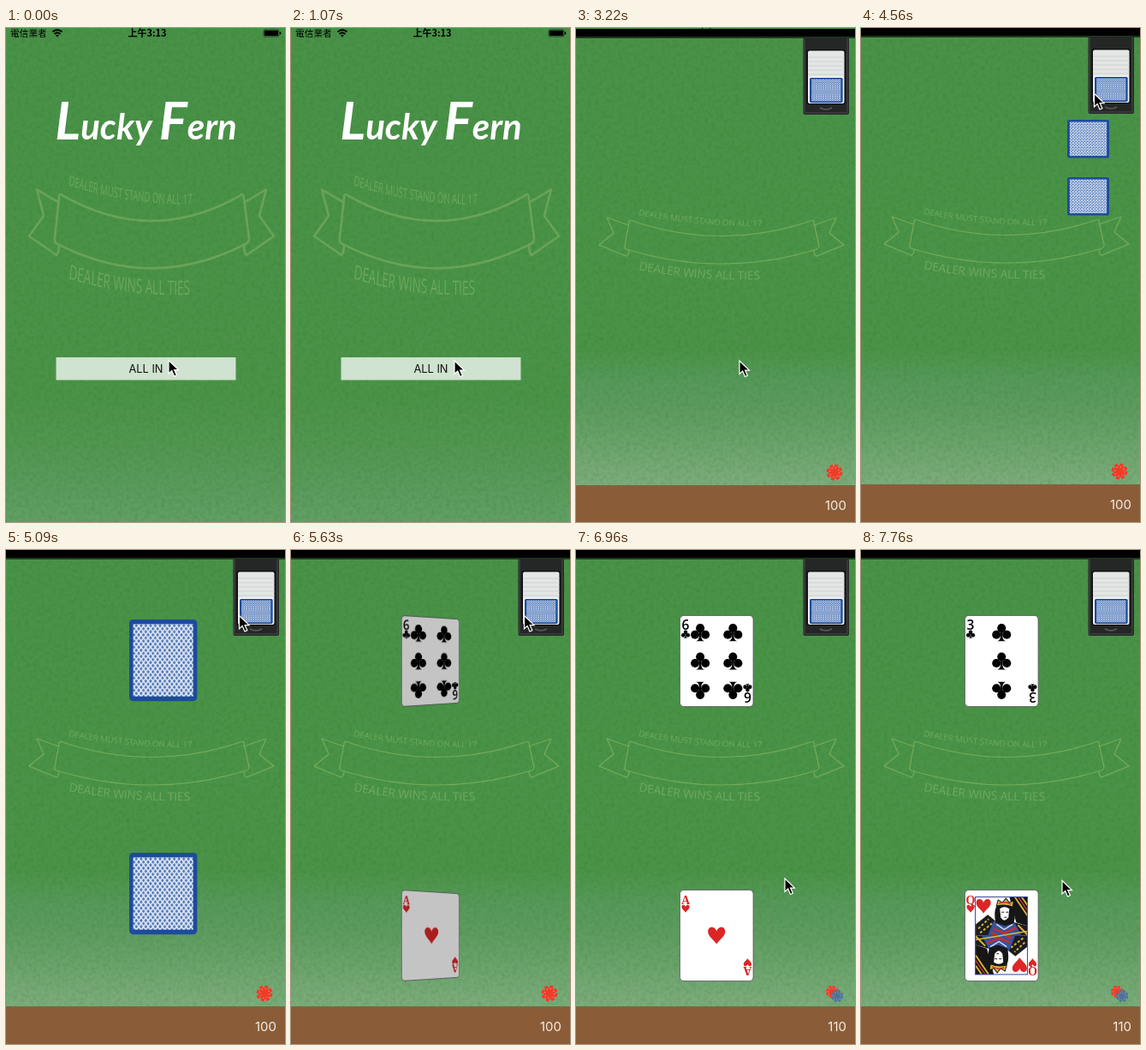
An HTML page that plays this animation: 326x576 px, repeating every 8 s.

```html
<!DOCTYPE html>
<html lang="zh-Hant">
<head>
<meta charset="utf-8">
<style>
html, body { margin: 0; width: 100%; height: 100%; overflow: hidden; background: #000; }
#stage { position: relative; width: 326px; height: 576px; overflow: hidden; }
#stage > *, #game > * { position: absolute; left: 0; top: 0; }
#game { width: 326px; height: 576px; }
svg { display: block; overflow: visible; }
text { font-family: Inter, "Liberation Sans", sans-serif; }
.cjk { font-family: "Noto Sans CJK TC", "Noto Sans CJK", "Noto Sans CJK JP", sans-serif; font-weight: 500; }
.clock { font-weight: 700; }
.title { font: italic 700 42px Lato, sans-serif; }
.title tspan { font-size: 62px; }
.felt text { font-family: "Open Sans", sans-serif; fill: #7cb264; stroke: none; }
.felt path { fill: none; vector-effect: non-scaling-stroke; stroke-linejoin: round; }
.index { font: 600 15.5px "Open Sans", sans-serif; }
.court { font: bold 14px "Liberation Serif", serif; }
</style>
</head>
<body>
<div id="stage">
  <svg id="home" width="326" height="576">
    <defs>
      <linearGradient id="homeFelt" x2="0" y2="1">
        <stop offset="0" stop-color="#4a9149"/><stop offset=".75" stop-color="#4c9349"/>
        <stop offset=".87" stop-color="#559755"/><stop offset="1" stop-color="#639f66"/>
      </linearGradient>
      <linearGradient id="gameFelt" x2="0" y2="1">
        <stop offset="0" stop-color="#4a9249"/><stop offset=".65" stop-color="#4c9349"/>
        <stop offset=".71" stop-color="#57985a"/><stop offset=".78" stop-color="#609c61"/>
        <stop offset=".92" stop-color="#7dac7d"/>
      </linearGradient>
      <filter id="grain" x="0" y="0" width="1" height="1">
        <feTurbulence type="fractalNoise" baseFrequency=".22" numOctaves="2" seed="4"/>
        <feColorMatrix values="0 0 0 0 0  0 0 0 0 .15  0 0 0 0 0  .3 0 0 0 -.11"/>
      </filter>
      <pattern id="lattice" width="6" height="8" patternUnits="userSpaceOnUse">
        <rect width="6" height="8" fill="#4a72b5"/>
        <path d="M0 0L6 8M6 0L0 8" stroke="#e4ebf6" stroke-width="1.7"/>
      </pattern>
      <g id="back">
        <rect width="86" height="106" rx="5" fill="#1d4b9b"/>
        <rect x="5" y="6" width="76" height="94" fill="url(#lattice)"/>
      </g>
      <path id="heart" d="M0 10C-3 5-10 1-10-4.5C-10-11-2-11.5 0-5C2-11.5 10-11 10-4.5C10 1 3 5 0 10Z" fill="#dc2626"/>
      <g id="club">
        <circle cy="-5" r="5"/><circle cx="-6" cy="2.5" r="5"/><circle cx="6" cy="2.5" r="5"/>
        <path d="M-2-3H2L1 3Q1 9 5 10H-5Q-1 9-1 3Z"/>
      </g>
      <g id="chip">
        <circle r="7" fill="currentColor"/>
        <circle r="7.5" fill="none" stroke="currentColor" stroke-width="4" stroke-dasharray="3.9 1.99"/>
        <circle r="5.5" fill="none" stroke="#fff" stroke-opacity=".3" stroke-width="1.5" stroke-dasharray="1.6 2.72"/>
      </g>
      <path id="arc1" d="M73 218Q145 232 222 231"/>
      <path id="arc2" d="M73 282Q140 295 220 293"/>
      <g id="banner" class="felt">
        <path d="M66 225Q170 260 274 225Q278 223 278 227L284 254Q284 257 281 258Q170 292 59 258Q56 257 57 254L62 227Q62 223 66 225Z"/>
        <path d="M62 230L36 221L44 239L27 253L59 266Q62 264 62 259M278 230L304 221L296 239L313 253L281 266Q278 264 278 259"/>
        <text font-size="9.6"><textPath href="#arc1">DEALER MUST STAND ON ALL 17</textPath></text>
        <text font-size="13.6"><textPath href="#arc2">DEALER WINS ALL TIES</textPath></text>
      </g>
    </defs>
    <rect width="326" height="576" fill="url(#homeFelt)"/>
    <rect width="326" height="576" filter="url(#grain)"/>
    <text class="cjk" x="5" y="10" font-size="10.7">電信業者</text>
    <text class="cjk clock" x="165" y="10" font-size="11" text-anchor="middle">上午3:13</text>
    <g fill="none" stroke="#000" stroke-width="1.8">
      <path d="M54.5 4.5Q60 0 65.5 4.5M56.5 7Q60 4 63.5 7"/>
      <path d="M60 10.5L58 8.5Q60 7 62 8.5Z" fill="#000" stroke="none"/>
    </g>
    <rect x="301" y="2" width="18" height="8" rx="2" fill="none" stroke="#000" stroke-opacity=".6"/>
    <rect x="302" y="3" width="16" height="6" rx="1"/>
    <path d="M320.5 4.5v3" stroke="#000" stroke-width="1.5"/>
    <text class="title" x="163.5" y="130" fill="#fff" text-anchor="middle"><tspan>L</tspan>ucky <tspan>F</tspan>ern</text>
    <use href="#banner" transform="matrix(1 0 0 1.7 0 -187.4)" stroke="#78ab5f" stroke-width="2.6" opacity=".7"/>
    <rect x="58.5" y="384" width="210" height="26.5" fill="#d0e2d0"/>
    <text id="allIn" x="163.5" y="402" font-size="12.8" text-anchor="middle">ALL IN</text>
  </svg>

  <div id="game">
    <svg width="326" height="576">
      <rect width="326" height="576" fill="url(#gameFelt)"/>
      <rect width="326" height="532" filter="url(#grain)"/>
      <rect width="326" height="9"/>
      <rect y="9" width="326" height="2" fill-opacity=".6"/>
      <use href="#banner" y="-1" stroke="#84b45f" stroke-width="1.2" opacity=".75"/>
      <rect x="265.5" y="10" width="53.5" height="90" rx="2" fill="#252726"/>
      <path d="M267 11V98H317V11" fill="none" stroke="#484a48"/>
      <rect x="269.5" y="24" width="45.5" height="64" rx="3" fill="#0c0d0c"/>
      <rect x="271" y="25.5" width="42.5" height="61.5" rx="2" fill="#e4e5e5"/>
      <path d="M271 33h42.500m-42.5 5h42.500m-42.5 5h42.500m-42.5 5h42.500m-42.5 5h42.5" stroke="#d0d2d2"/>
      <rect x="272" y="56" width="40.5" height="31" rx="2" fill="#fff"/>
      <use href="#back" transform="translate(273 57) scale(.45 .275)"/>
      <path d="M285 92Q292 96 299 92" fill="none" stroke="#5a5c5a" stroke-width="1.5"/>
      <rect y="532" width="326" height="44" fill="#8a5d38"/>
      <rect y="532" width="326" height="1" fill="#7a6a40"/>
      <g id="oneChip"><use href="#chip" x="302" y="517" color="#ef3c28"/></g>
      <g id="twoChips">
        <use href="#chip" transform="translate(299 515) scale(.76)" color="#ef3c28"/>
        <use href="#chip" transform="translate(305 520) scale(.76)" color="#4f7299"/>
      </g>
      <text id="score" x="316" y="560.5" font-size="15" fill="#f3ece6" text-anchor="end"></text>
    </svg>
    <svg class="card" viewBox="0 0 86 106" preserveAspectRatio="none"></svg>
    <svg class="card" viewBox="0 0 86 106" preserveAspectRatio="none"></svg>
  </div>

  <svg id="cursor" width="14" height="20">
    <path d="M.5.5V16L4.2 12.600L7 19L9.900 17.700L7.100 11.600H12Z" stroke="#fff" stroke-width="1.2"/>
  </svg>
</div>
<script>
const $ = id => document.getElementById(id);
const LOOP = 8000;

const TICKS = [0, 1070, 2690, 2950, 3220, 3480, 3750, 4020, 4290, 4560, 4830, 5090,
  5360, 5630, 5890, 6160, 6430, 6700, 6960, 7230, 7490, 7760];

const SLIDE = [[2690, 576], [2950, 40], [3220, 1], [3480, 0]];
const DEAL = [[4290, .045], [4560, .21], [4830, .49], [5090, .85], [5360, 1]];
const FLIP = [[5090, 180], [5360, 120], [5630, 35], [5890, 7], [6160, 0]];
const POINTER = [[0, 189.5, 387], [1070, 190.5, 387.5], [3480, 190.5, 387.5], [3750, 280, 176.5],
  [4020, 272, 76], [5630, 272, 76], [5890, 258, 240], [6160, 257.5, 300], [6430, 243.5, 266],
  [6700, 244, 421], [6960, 243.5, 382.5], [7230, 242, 372.5], [7490, 237.5, 380], [7760, 234.5, 385]];

const mix = (a, b, p) => a + (b - a) * p;

function track(keys, t, i = 1) {
  const n = keys.findIndex(k => k[0] > t);
  if (n === 0) return keys[0][i];
  if (n < 0) return keys[keys.length - 1][i];
  const a = keys[n - 1], b = keys[n];
  return mix(a[i], b[i], (t - a[0]) / (b[0] - a[0]));
}

const suit = (name, x, y, size, turn = 0) =>
  `<use href="#${name}" transform="translate(${x} ${y}) rotate(${turn}) scale(${size})"/>`;
const pips = (name, spots) =>
  spots.map(([x, y]) => suit(name, x, y, 1, y > 60 ? 180 : 0)).join('');
const twice = art => `${art}<g transform="rotate(180 43 53)">${art}</g>`;

function face(rank, name, art) {
  const color = name === 'heart' ? '#dc2626' : '#000';
  const style = rank > 0 ? 'index' : 'court';
  const corner = `<text class="${style}" x="7" y="16.5" text-anchor="middle" fill="${color}">${rank}</text>`
    + suit(name, 7, 22, .46);
  return `<rect x=".4" y=".4" width="85.2" height="105.2" rx="4.5" fill="#fff" stroke="#555" stroke-width=".8"/>`
    + twice(corner) + art;
}

const halfQueen = `
  <path d="M52 8H73V42L60 38Z" fill="#161616"/>
  <path d="M58 8L73 30M66 8L73 18" stroke="#d8bb3a" stroke-width="1.8"/>
  <path d="M62 8L73 24" stroke="#c92c2c" stroke-width="1.5"/>
  <path d="M13 53V40L27 29L38 38H58L73 42V53Z" fill="#1b1b22"/>
  <path d="M16 45L28 34M18 50L32 39" stroke="#cdb02f" stroke-width="2" stroke-dasharray="3 2"/>
  <path d="M34 36H57L66 53H27Z" fill="#37539b"/>
  <path d="M33 45L46 50L60 44M31 50L38 53" fill="none" stroke="#c92c2c" stroke-width="2.5"/>
  <path d="M37 40L46 46L56 40" fill="none" stroke="#dfe6f2" stroke-width="1.2"/>
  <path d="M62 41L73 52" stroke="#d8bb3a" stroke-width="2"/>
  <path d="M36 38Q33 20 40 17H54Q61 28 57 39L47 42Z" fill="#161616"/>
  <path d="M41 22Q46 18 52 22L51 32Q46 39 42 32Z" fill="#fff"/>
  <path d="M43 26h3m2 0h3m-5 6h3" stroke="#222"/>
  <path d="M37 19L39 12L44 15L48 10L52 15L57 13L56 20Q46 16 37 19Z" fill="#d8bb3a" stroke="#161616"/>
  <path d="M40 16Q47 13 54 17" fill="none" stroke="#c92c2c" stroke-width="1.5"/>
  ${suit('heart', 22, 19, .85)}`;

const FACES = {
  back: '<use href="#back"/>',
  six: face(6, 'club', pips('club', [[24, 20], [62, 20], [24, 53], [62, 53], [24, 87], [62, 87]])),
  three: face(3, 'club', pips('club', [[43, 20], [43, 53], [43, 87]])),
  ace: face('A', 'heart', pips('heart', [[43, 53]])),
  queen: face('Q', 'heart', twice(halfQueen)
    + '<path d="M13 58L73 48" stroke="#d8bb3a" stroke-width="1.5"/>'
    + '<rect x="12.5" y="8.5" width="60.5" height="89.5" fill="none" stroke="#3448a0"/>')
};

const cards = [...document.querySelectorAll('.card')];

function drawCard(el, t, endY, name) {
  const p = track(DEAL, t), turn = track(FLIP, t);
  const isBack = turn > 90, angle = isBack ? turn - 180 : turn;
  const lean = Math.abs(Math.sin(angle * Math.PI / 180));
  el.innerHTML = FACES[isBack ? 'back' : name];
  Object.assign(el.style, {
    display: t < 4290 ? 'none' : 'block',
    left: mix(273, 121, p) + 'px',
    top: mix(115, endY, p) + 'px',
    width: mix(39, 86.5, p) + 'px',
    height: mix(28, 107, p) + 'px',
    transform: lean > .001 ? `perspective(560px) translateZ(${-43 * lean}px) rotateY(${angle}deg)` : 'none',
    filter: lean > .001 ? `brightness(${1 - .4 * lean})` : 'none'
  });
}

function draw(t) {
  $('allIn').setAttribute('fill', t < 2690 ? '#111' : '#aabfaa');
  $('game').style.transform = `translateY(${track(SLIDE, t)}px)`;
  const won = t >= 6700, redealt = t >= 7230;
  $('score').textContent = won ? 110 : 100;
  $('oneChip').style.display = won ? 'none' : '';
  $('twoChips').style.display = won ? '' : 'none';
  drawCard(cards[0], t, 75.5, redealt ? 'three' : 'six');
  drawCard(cards[1], t, 395.5, redealt ? 'queen' : 'ace');
  $('cursor').style.transform = `translate(${track(POINTER, t, 1)}px, ${track(POINTER, t, 2)}px)`;
}

let shown = -1;
function frame() {
  const now = performance.now() % LOOP;
  const tick = TICKS.filter(t => t <= now).pop();
  if (tick !== shown) draw(shown = tick);
  requestAnimationFrame(frame);
}
frame();
</script>
</body>
</html>
```
